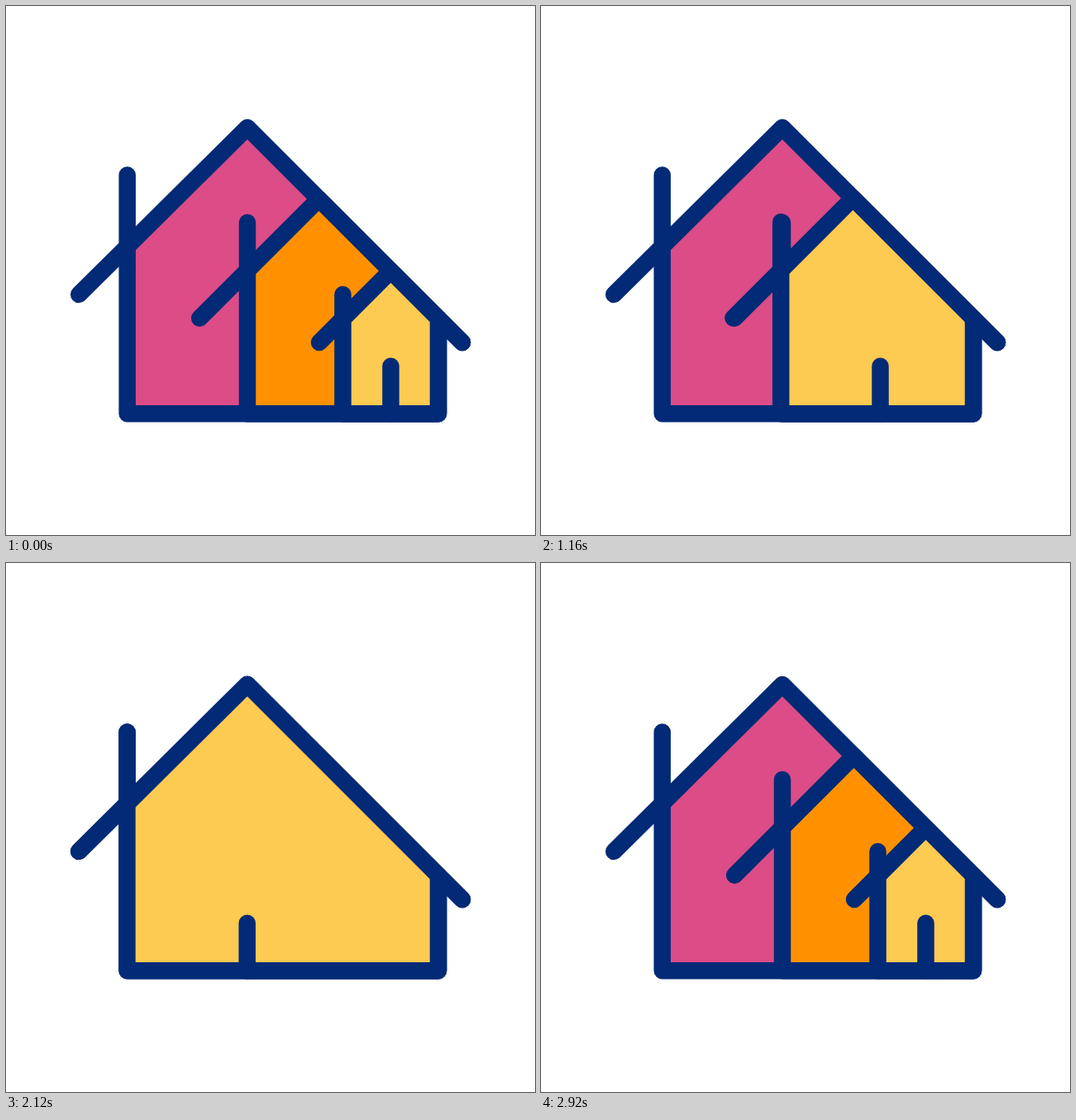
These frames come from a looping animation (640x640 px, 3000 ms). An HTML page with a canvas:

```html
<!DOCTYPE html>
<html lang="en">
<head>
<meta charset="utf-8">
<title>Growing house</title>
<style>
html, body { margin: 0; height: 100%; overflow: hidden; background: #fff; }
canvas { display: block; }
</style>
</head>
<body>
<canvas id="stage" width="640" height="640"></canvas>
<script>
const ctx = document.getElementById('stage').getContext('2d');
const LOOP = 3000, STEP = 40;
const NAVY = '#032a76', PINK = '#dc4c87', ORANGE = '#ff9100', YELLOW = '#fdca52';
const RIGHT = 523, FLOOR = 493.3;

// Pose: wall x, apex x, chimney top y, eave x, eave y, door x
const small     = [407.5, 465.5, 349, 379, 407, 465.5];
const medium    = [292, 378.5, 262, 234.2, 377.8, 412];
const mediumBig = [280, 371.5, 261.5, 228, 367, 400];
const large     = [146.7, 292, 204.5, 88.2, 349, 292];
const largeBig  = [134.5, 285.5, 206, 84, 342, 280];

const keys = [
  [0, small], [222, small], [555, mediumBig], [810, medium],
  [1139, medium], [1472, largeBig], [1710, large],
  [2100, large], [2333, largeBig], [2895, small], [LOOP, small]
];

const ease = u => u * u * (3 - 2 * u);

function poseAt(t) {
  const i = keys.findIndex(k => t < k[0]);
  const [t0, a] = keys[i - 1], [t1, b] = keys[i];
  const u = ease((t - t0) / (t1 - t0));
  return a.map((v, n) => v + (b[n] - v) * u);
}

function trace(points) {
  ctx.beginPath();
  points.forEach(p => ctx.lineTo(...p));
}

function line(...points) {
  trace(points);
  ctx.stroke();
}

function house([wall, apexX, chimneyY, eaveX, eaveY, door], color, hasDoor) {
  const apexY = apexX - 145;
  const slope = (eaveY - apexY) / (apexX - eaveX);
  trace([
    [wall, apexY + (apexX - wall) * slope], [apexX, apexY],
    [RIGHT, RIGHT - 145], [RIGHT, FLOOR], [wall, FLOOR]
  ]);
  ctx.fillStyle = color;
  ctx.fill();
  line([wall, chimneyY], [wall, FLOOR], [RIGHT, FLOOR], [RIGHT, RIGHT - 145]);
  line([eaveX, eaveY], [apexX, apexY], [552, 407]);
  if (hasDoor) line([door, 435.7], [door, FLOOR]);
}

function draw(now) {
  // 25 pictures a second, with a little slack for timer jitter
  const t = Math.floor((now + 8) / STEP) * STEP % LOOP;
  ctx.fillStyle = '#fff';
  ctx.fillRect(0, 0, 640, 640);
  ctx.strokeStyle = NAVY;
  ctx.lineWidth = 20.5;
  ctx.lineCap = ctx.lineJoin = 'round';
  house(large, PINK);
  house(medium, ORANGE);
  house(poseAt(t), YELLOW, true);
}

const start = performance.now();
function tick() {
  draw(performance.now() - start);
  requestAnimationFrame(tick);
}
tick();
</script>
</body>
</html>
```
